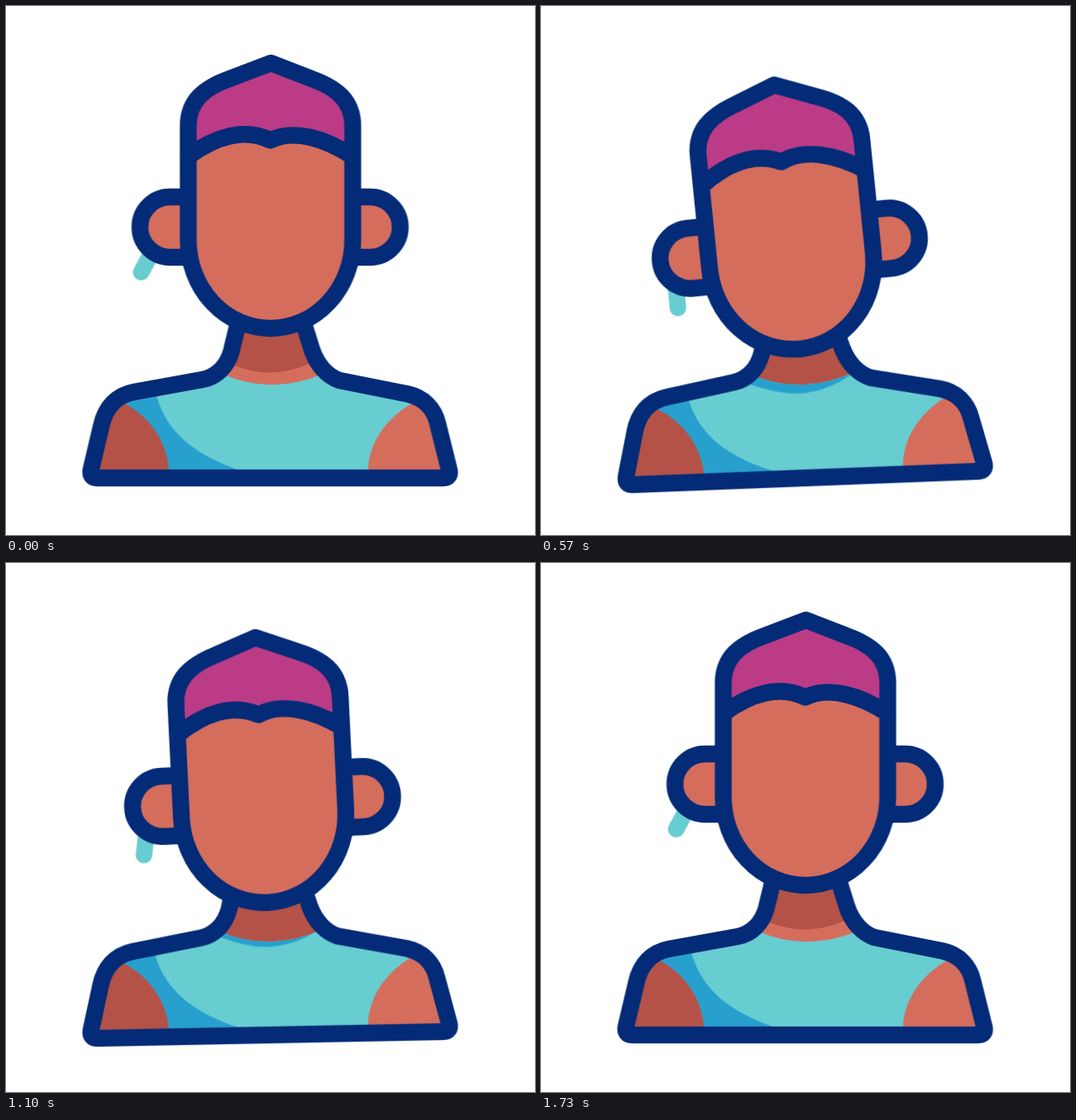
Recreate the animation shown at these times as an HTML page. Size 640 px wide and 640 px high, loop 2 s.

```html
<!DOCTYPE html>
<html lang="en">
<head>
<meta charset="utf-8">
<title>Head tilt</title>
<style>
  html, body { margin: 0; width: 100%; height: 100%; overflow: hidden; background: #fff; }
  svg { display: block; width: 100%; height: 100%; }

  .skin { fill: #d56d5d; }
  .shade { fill: #b45247; }
  .shirt { fill: #67cdd1; }
  .fold { fill: #27a0ce; }
  .hair { fill: #bb3b86; }
  .line { fill: none; stroke: #042b77; stroke-width: 20.4; stroke-linecap: round; stroke-linejoin: round; }
  .ear { fill: #d56d5d; }
  .earring { stroke: #67cdd1; stroke-width: 20; stroke-linecap: round; }

  .sway, .nod, .earring {
    animation: 2s cubic-bezier(.315, 0, .667, 1) infinite;
  }
  .sway { animation-name: sway; transform-origin: 320px 561px; }
  .nod { animation-name: nod; transform-origin: 320px 399px; }
  .earring { animation-name: swing; transform-origin: 178.4px 295.7px; }

  /* rest, left, right, left, rest */
  @keyframes sway {
    0%, 86.667%, 100% { transform: rotate(0deg); }
    21.667%, 65% { transform: rotate(-5deg); animation-timing-function: cubic-bezier(.42, 0, .28, 1); }
    43.333% { transform: rotate(4deg); }
  }
  @keyframes nod {
    0%, 86.667%, 100% { transform: translateY(0) rotate(0deg); }
    21.667%, 65% { transform: translateY(34.7px) rotate(-8.1deg); animation-timing-function: cubic-bezier(.42, 0, .28, 1); }
    43.333% { transform: translateY(2.7px) rotate(6.7deg); }
  }
  @keyframes swing {
    0%, 86.667%, 100% { transform: rotate(28.6deg); }
    21.667%, 65% { transform: rotate(-21deg); animation-timing-function: cubic-bezier(.42, 0, .28, 1); }
    43.333% { transform: rotate(49deg); }
  }
</style>
</head>
<body>
<svg viewBox="0.5 0 640 640">
  <defs>
    <path id="torso" d="M281 378 V385 L273 418 C268 436 255 449 238 452 L155 467
      C134 471 121 486 116 507 L103.3 561 Q101.5 571 111 571 H529 Q539 571 536.7 561
      L523 506 C519 487 506 474 487 469.5 L404 453 C389 448 377 434 371 417 L361 385 V378"/>
    <path id="top" d="M262 445 Q320 471 382 446 L491 440 V481
      C461 499 440 527 438.5 561 V580 H90 V440 Z"/>
    <path id="shadow" d="M225 412 C262 430 290 443.5 320 443.5 S378 430 415 405 V300 H225 Z"/>
    <path id="skull" d="M321 69 L271 88 C240 99 221 115 221 145 V283
      A99.5 107 0 0 0 420 283 V145 C420 115 401 99 370 88 Z"/>
    <clipPath id="inTorso"><use href="#torso"/></clipPath>
    <clipPath id="inTop"><use href="#top"/></clipPath>
  </defs>

  <g class="sway">
    <g clip-path="url(#inTorso)">
      <rect class="skin" x="80" y="360" width="480" height="230"/>
      <use href="#shadow" class="shade nod"/>
      <use href="#top" class="shirt"/>
      <path class="fold" d="M90 440 H176 L183 473 C196 518 231 543 281 561 V580 H90 Z"/>
      <g clip-path="url(#inTop)"><use href="#shadow" class="fold nod"/></g>
      <path class="shade" d="M90 440 L146 482 C177 499 195.5 530 197.5 561 V580 H90 Z"/>
    </g>
    <use href="#torso" class="line"/>

    <g class="nod">
      <path class="earring" d="M178.4 295.7 v30"/>
      <g class="line">
        <path class="ear" d="M221 231 H199 a36.5 36.5 0 0 0 0 73 H221"/>
        <path class="ear" d="M420 231 H441 a36.5 36.5 0 0 1 0 73 H420"/>
      </g>
      <use href="#skull" class="skin"/>
      <path class="hair" d="M321 69 L271 88 C240 99 221 115 221 145 V182
        C255 157 290 147.5 320 162.5 C349 148.5 386 160 420 182 V145 C420 115 401 99 370 88 Z"/>
      <path class="line" d="M221 182 C255 157 290 147.5 320 162.5 C349 148.5 386 160 420 182"/>
      <use href="#skull" class="line"/>
    </g>
  </g>
</svg>
<script>
  // Snap the CSS motion to 30 steps per second.
  const LOOP = 2000, RATE = 0.03, LAST = 52;
  const start = performance.now();
  const moves = document.getAnimations();
  moves.forEach(m => m.pause());

  function tick(now) {
    const t = Math.max(0, now - start) % LOOP;
    const step = Math.min(LAST, Math.floor(t * RATE + 0.15));
    moves.forEach(m => { m.currentTime = step / RATE; });
    requestAnimationFrame(tick);
  }
  tick(start);
</script>
</body>
</html>
```
